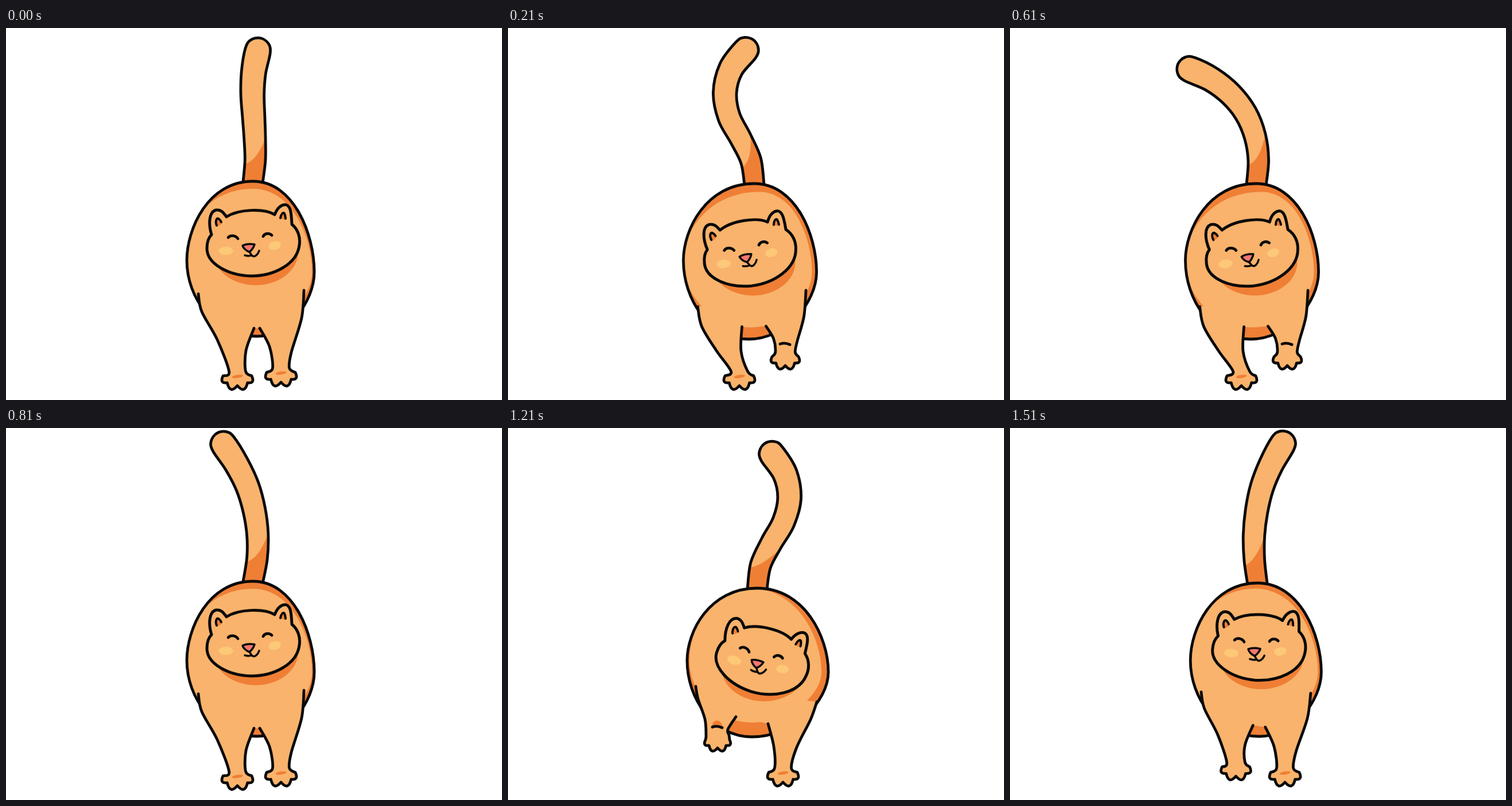
Write an HTML page that moves like this. It is 864 px wide and 648 px high and loops after 1610 ms.

```html
<!DOCTYPE html>
<html lang="en">
<head>
<meta charset="utf-8">
<title>Walking cat</title>
<style>
  html, body { margin: 0; width: 100%; height: 100%; overflow: hidden; background: #fff; }
  svg { display: block; width: 100%; height: 100%; }
  .line { fill: none; stroke: #0a0a0a; stroke-width: 4.8; stroke-linecap: round; stroke-linejoin: round; }
  .thin { stroke-width: 3.5; }
  .coat { fill: #f9b36c; }
  .shade { fill: #ef7f35; }
  .cheek { fill: #fdc878; }
</style>
</head>
<body>
<svg viewBox="0 0 864 648">
  <defs>
    <clipPath id="tailClip"><path id="tailEdge"/></clipPath>
    <clipPath id="torsoClip"><path id="torsoEdge"/></clipPath>
  </defs>
  <path id="tailFill" class="coat"/>
  <path id="tailShade" class="shade" clip-path="url(#tailClip)"/>
  <path id="tailLine" class="line"/>
  <path id="torsoFill" class="shade"/>
  <path id="torsoLight" class="coat" clip-path="url(#torsoClip)"/>
  <path id="torsoLine" class="line"/>
  <path id="front" class="coat"/>
  <ellipse id="chin" class="shade" rx="74" ry="58"/>
  <ellipse id="markL" class="shade" rx="9.5" ry="2.8"/>
  <ellipse id="markR" class="shade" rx="9.5" ry="2.8"/>
  <g id="wristL">
    <path class="shade" d="M-9 -1C-7 -15 7 -15 10 0Z"/>
    <path class="line" d="M-8 0Q0 -3 9 1"/>
  </g>
  <g id="wristR">
    <path class="shade" d="M-9 -1C-7 -15 7 -15 10 0Z"/>
    <path class="line" d="M-8 0Q0 -3 9 1"/>
  </g>
  <path id="legL" class="line"/>
  <path id="legR" class="line"/>
  <g id="head">
    <path class="line" style="fill:#f9b36c;stroke-width:5" d="M358 360C352 340 354 320 366 317C375 316 379 322 384 329C406 315 450 314 468 325C473 312 481 307 488 308C497 311 497 326 498 342C509 351 513 365 511 378C507 412 466 432 427 432C386 431 350 410 350 384C350 374 353 365 358 360Z"/>
    <path class="shade" d="M368 346Q366 335 370 333L377 340ZM477 332Q481 322 485 323L487 334Z"/>
    <path class="line" style="stroke-width:4" d="M367 344C364 336 367 331 370 332Q374 335 375 338M478 331C479 324 483 320 485 323Q487 328 487 332"/>
    <path class="line" d="M387 365C391 360 400 361 404 367M448 363C451 357 459 357 463 361"/>
    <ellipse class="cheek" rx="12.5" ry="7.5" transform="translate(383 388)"/>
    <ellipse class="cheek" rx="11" ry="7.3" transform="translate(468 379) rotate(-12)"/>
    <path class="line thin" style="fill:#f4776f" d="M412 379C418 376 427 376 433 377C432 382 427 388 424 390C418 388 413 383 412 379Z"/>
    <path class="line thin" d="M424 390L428 396M416 396Q423 398 428 396C433 401 439 394 441 388"/>
  </g>
</svg>
<script>
const el = id => document.getElementById(id);
const draw = (id, d) => el(id).setAttribute('d', d);
const place = (id, x, y, turn) => el(id).setAttribute('transform', `translate(${x} ${y}) rotate(${turn})`);
const show = (node, on) => node.setAttribute('visibility', on ? 'visible' : 'hidden');

// Blend numbers, or lists of any depth
const mix = (a, b, u) => Array.isArray(a) ? a.map((v, i) => mix(v, b[i], u)) : a + (b - a) * u;

// The point at distance r in a direction measured clockwise from straight up
const polar = ([x, y], r, deg) => {
  const a = deg * Math.PI / 180;
  return [x + r * Math.sin(a), y - r * Math.cos(a)];
};

// Smooth open curve through the points
function curve(p, start = 'M') {
  const at = i => p[Math.max(0, Math.min(p.length - 1, i))];
  let d = start + p[0];
  for (let i = 0; i < p.length - 1; i++) {
    const [a, b, c, e] = [at(i - 1), at(i), at(i + 1), at(i + 2)];
    const out = [0, 1].map(k => b[k] + (c[k] - a[k]) / 6);
    const into = [0, 1].map(k => c[k] - (e[k] - b[k]) / 6);
    d += `C${out} ${into} ${c}`;
  }
  return d;
}

// Three poses: upright, leaning left, leaning right.
// body, light: left, top, right, bottom, x of the bottom, x of the top
// legs: [points down the left side], [paw x, y, lift], [points up the right side]
// head: nose x, y, tilt
const upright = {
  body: [315, 267, 537, 537, 437, 430],
  light: [306, 280, 533, 518, 437, 430],
  legL: [[[335, 463], [341, 494], [368, 543]], [403, 606, 0], [[418, 562], [432, 523]]],
  legR: [[[442, 523], [459, 555]], [479, 600, 0], [[497, 565], [515, 505], [519, 457]]],
  head: [423, 382, 0]
};
const leanLeft = {
  body: [296, 275, 538, 547, 402, 428],
  light: [304, 291, 526, 525, 410, 446],
  legL: [[[326, 508], [334, 546], [358, 581]], [403, 606, 0], [[394, 564], [383, 518]]],
  legR: [[[457, 516], [466, 527]], [487, 545, 1], [[511, 525], [516, 500], [519, 457]]],
  head: [406, 418, -14]
};
const leanRight = {
  body: [312, 279, 558, 538, 425, 434],
  light: [316, 279, 546, 513, 425, 420],
  legL: [[[327, 450], [331, 472], [343, 507]], [365, 543, 1], [[383, 525], [397, 503]]],
  legR: [[[453, 515], [463, 555]], [479, 600, 0], [[503, 556], [527, 508], [538, 477]]],
  head: [434, 410, 16.5]
};

// Egg shape between its four extremes
function egg([l, t, r, b, bx, tx]) {
  const ly = 405, ry = 425;
  return `M${l} ${ly}C${l} ${mix(ly, t, .4)} ${mix(tx, l, .68)} ${t} ${tx} ${t}` +
    `C${mix(tx, r, .67)} ${t} ${r} ${mix(ry, t, .41)} ${r} ${ry}` +
    `C${r} ${mix(ry, b, .45)} ${mix(bx, r, .55)} ${b} ${bx} ${b}` +
    `C${mix(bx, l, .6)} ${b} ${l} ${mix(ly, b, .5)} ${l} ${ly}Z`;
}

// Leg with a paw of four round toes; a lifted paw is smaller and has no ankle
function leg([left, [x, y, lift], right], start) {
  const size = 1 - .16 * lift, ankle = mix(14.5, 20, lift);
  const rim = (deg, rx, ry) => {
    const a = deg * Math.PI / 180;
    return [x + size * rx * Math.cos(a), y + size * ry * Math.sin(a)];
  };
  let toes = '';
  for (let deg = 180; deg > 0; deg -= 45) {
    toes += `Q${rim(deg - 22.5, 34, 35)} ${rim(deg - 45, 25, 17)}`;
  }
  return curve([...left, [x - ankle, y - 8], rim(180, 25, 0)], start) + toes +
    curve([rim(0, 25, 0), [x + ankle, y - 8], ...right], 'L');
}

function paw(side, [x, y, lift]) {
  const mark = el('mark' + side), wrist = el('wrist' + side);
  place('mark' + side, x, y + 1, -8);
  place('wrist' + side, x - 1, y - 22, 0);
  show(mark, lift < .15);
  show(wrist, lift > .45);
  wrist.firstElementChild.style.opacity = lift > .65 ? 1 : 0;
}

// Bend of the six tail segments, in degrees, through half a swing;
// the other half is the mirror image
const BEND = [
  [6, -1, -3, -3, 3, 11],
  [-8, -25, -28, -10, 14, 38],
  [-9, -31, -41, -37, -13, 5],
  [5, -8, -22, -38, -52, -65],
  [10, 1, -8, -16, -26, -33]
];
const HALF = 9.7;

function tail(phase, root) {
  const v = phase % HALF, i = Math.floor(v / 2);
  const next = BEND[i + 1] || BEND[0].map(a => -a);
  const side = phase < HALF ? 1 : -1;
  const bend = mix(BEND[i], next, (v - 2 * i) / Math.min(2, HALF - 2 * i)).map(a => a * side);
  const step = 42.5 - 4 * Math.max(0, 1 - v / 2);

  const left = [], right = [];
  let p = root;
  for (let j = 0; j <= bend.length; j++) {
    const before = bend[Math.max(0, j - 1)], after = bend[Math.min(j, bend.length - 1)];
    const turn = (before + after) / 2, width = 17 + 5 * j / bend.length;
    left.push(polar(p, width, turn - 90));
    right.push(polar(p, width, turn + 90));
    if (j < bend.length) p = polar(p, step, after);
  }
  const end = bend[bend.length - 1];
  const cap = [-45, 0, 45].map(a => polar(p, 22, end + a));
  const edge = curve([...left, ...cap, ...right.slice().reverse()]);
  for (const id of ['tailEdge', 'tailFill', 'tailLine']) draw(id, edge);
  draw('tailShade', `M${left[0]}L${mix(left[0], left[1], .8)}Q${mix(left[1], right[1], .6)} ${right[2]}L${right[1]}L${right[0]}Z`);
}

const STEPS = 16;

function pose(step) {
  // The body sways evenly to the left and then to the right
  const lean = 1 - Math.abs(step % 8 - 4) / 4;
  const to = step < 8 ? leanLeft : leanRight;
  const now = part => mix(upright[part], to[part], lean);

  const body = now('body'), rump = egg(body);
  for (const id of ['torsoEdge', 'torsoFill', 'torsoLine']) draw(id, rump);
  draw('torsoLight', egg(now('light')));

  // The tail swings back at double speed
  tail(step + Math.max(0, step - 12), [body[5], body[1] + 2]);

  const left = now('legL'), right = now('legR');
  draw('legL', leg(left));
  draw('legR', leg(right));
  draw('front', leg(left) + leg(right, 'L') + 'Z');
  paw('L', left[1]);
  paw('R', right[1]);

  const [x, y, tilt] = now('head');
  place('chin', x + 12, y + 8, 0);
  el('head').setAttribute('transform', `translate(${x} ${y}) rotate(${tilt}) translate(-423 -382)`);
}

// Drawn on steps of 100 ms; the first one holds 10 ms longer
const LOOP = 1610, start = performance.now();
let last = -1;
function tick(now) {
  const t = Math.max(0, now - start) % LOOP;
  const step = Math.min(STEPS - 1, Math.max(0, Math.floor((t - 10) / 100)));
  if (step !== last) pose(last = step);
  requestAnimationFrame(tick);
}
tick(start);
</script>
</body>
</html>
```
